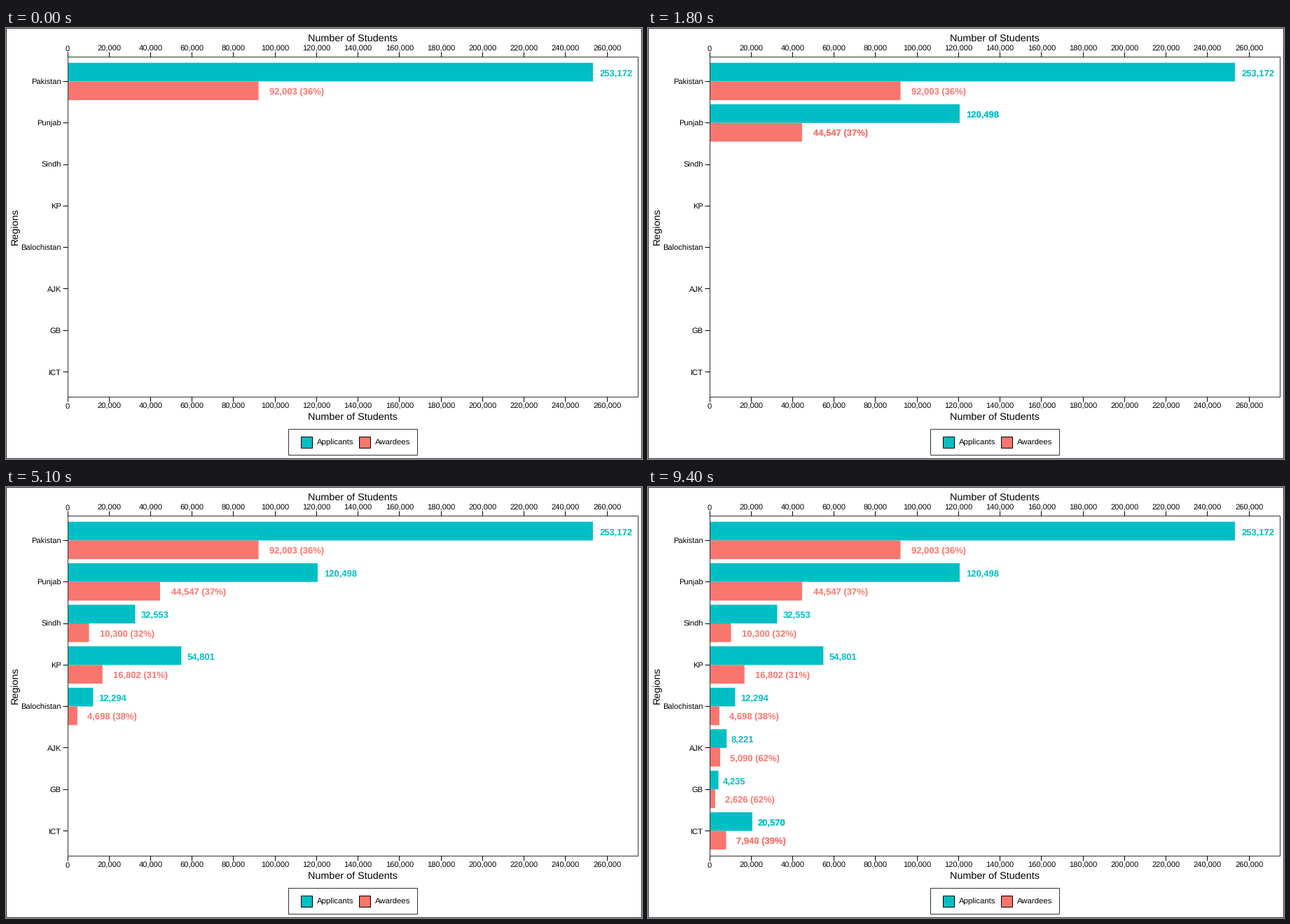
Animation, 908 px wide and 616 px high, one loop 10 s. Source, as a matplotlib script:

```python
import matplotlib.pyplot as plt
from matplotlib.animation import FuncAnimation
from matplotlib.patches import Rectangle

W, H, DPI = 908, 616, 100
PX = 72 / DPI  # points per pixel
STEP_MS, LOOP_MS = 100, 10000
TEAL, CORAL, FRAME = "#00BFC4", "#F8766D", "#333333"

LEFT, RIGHT, TOP, BOTTOM = 88.5, 902.5, 41.5, 527.5
X_SCALE = 770.2 / 260000
ROW_STEP, FIRST_ROW, BAR_H = 59.3, 76.4, 26.7

# region, applicants, awardees, percentage, time shown, time its label is overprinted
ROWS = [
    ("Pakistan", 253172, 92003, 36, 0, 500),
    ("Punjab", 120498, 44547, 37, 1200, 1800),
    ("Sindh", 32553, 10300, 32, 2500, 3100),
    ("KP", 54801, 16802, 31, 3800, 4400),
    ("Balochistan", 12294, 4698, 38, 5100, 5700),
    ("AJK", 8221, 5090, 62, 6400, 7000),
    ("GB", 4235, 2626, 62, 7600, 8200),
    ("ICT", 20570, 7940, 39, 8800, 9400),
]

plt.rcParams["font.family"] = "Liberation Sans"
plt.rcParams["text.hinting"] = "none"
# Snapping would push half-pixel coordinates over by one pixel.
plt.rcParams["path.snap"] = False

fig = plt.figure(figsize=(W / DPI, H / DPI), dpi=DPI, facecolor="white")
ax = fig.add_axes([0, 0, 1, 1])
ax.set_xlim(0, W)
ax.set_ylim(H, 0)
ax.axis("off")


def text(x, y, label, size, **style):
    style = {"ha": "center", "va": "baseline", "color": "black", **style}
    return ax.text(x, y, label, fontsize=size * PX, **style)


def box(x0, y0, x1, y1, fill="none", edge=FRAME, z=3):
    width = 0 if edge == "none" else PX
    patch = Rectangle((x0, y0), x1 - x0, y1 - y0, facecolor=fill,
                      edgecolor=edge, linewidth=width, zorder=z)
    return ax.add_patch(patch)


def tick(x0, y0, x1, y1):
    ax.plot([x0, x1], [y0, y1], color="black", lw=PX,
            solid_capstyle="butt", zorder=3)


def value_x(value):
    return 88 + value * X_SCALE


def pixel_center(position):
    return int(position) + 0.5


def bar(value, y, color, label):
    """A bar with two copies of its label, a fifth of its width past the end."""
    end = value_x(value)
    patch = box(88, y, end, y + BAR_H, color, "none", 1)
    labels = [text(end, y + 19, label, 13, ha="left", color=color,
                   weight="bold") for _ in range(2)]
    gap = 0.2 * labels[0].get_window_extent().width
    for item in labels:
        item.set_x(end + gap)
    return patch, *labels


def draw_frame():
    box(0.5, 0.5, W - 0.5, H - 0.5)
    box(LEFT, TOP, RIGHT, BOTTOM)
    for value in range(0, 260001, 20000):
        x = value_x(value)
        tick_x = pixel_center(x)
        tick(tick_x, TOP - 7, tick_x, TOP)
        tick(tick_x, BOTTOM, tick_x, BOTTOM + 7)
        text(x, 32.4, f"{value:,}", 11.15)
        text(x, 544, f"{value:,}", 11.15)
    for y in (19, 560):
        text(495, y, "Number of Students", 14.45)
    text(16.6, 284, "Regions", 14.45, rotation=90, rotation_mode="anchor")


def draw_legend():
    box(403.5, 573.5, 587.5, 610.5)
    for x, color, label in ((421.5, TEAL, "Applicants"),
                            (504.5, CORAL, "Awardees")):
        box(x, 584.5, x + 16, 600.5, color, "black")
        text(x + 22.5, 596, label, 11.4, ha="left")


def draw_rows():
    groups = []
    for i, (name, applied, awarded, percent, start, overprint) in enumerate(ROWS):
        y = FIRST_ROW + i * ROW_STEP
        tick_y = pixel_center(y)
        tick(81.5, tick_y, LEFT, tick_y)
        text(79, y + 4, name, 11.15, ha="right")
        bars = [bar(applied, y - BAR_H, TEAL, f"{applied:,}"),
                bar(awarded, y, CORAL, f"{awarded:,} ({percent}%)")]
        groups.append((bars, start, overprint))
    return groups


draw_frame()
draw_legend()
row_groups = draw_rows()
starts = [row[4] for row in ROWS] + [LOOP_MS]


def update(frame):
    now = frame * STEP_MS
    for i, (bars, start, overprint) in enumerate(row_groups):
        for patch, label, copy in bars:
            patch.set_visible(now >= start)
            label.set_visible(now >= start)
            copy.set_visible(overprint <= now < starts[i + 1])
    return []


anim = FuncAnimation(fig, update, frames=LOOP_MS // STEP_MS,
                     init_func=lambda: update(0), interval=STEP_MS,
                     repeat=True, repeat_delay=0)
plt.show()
```
